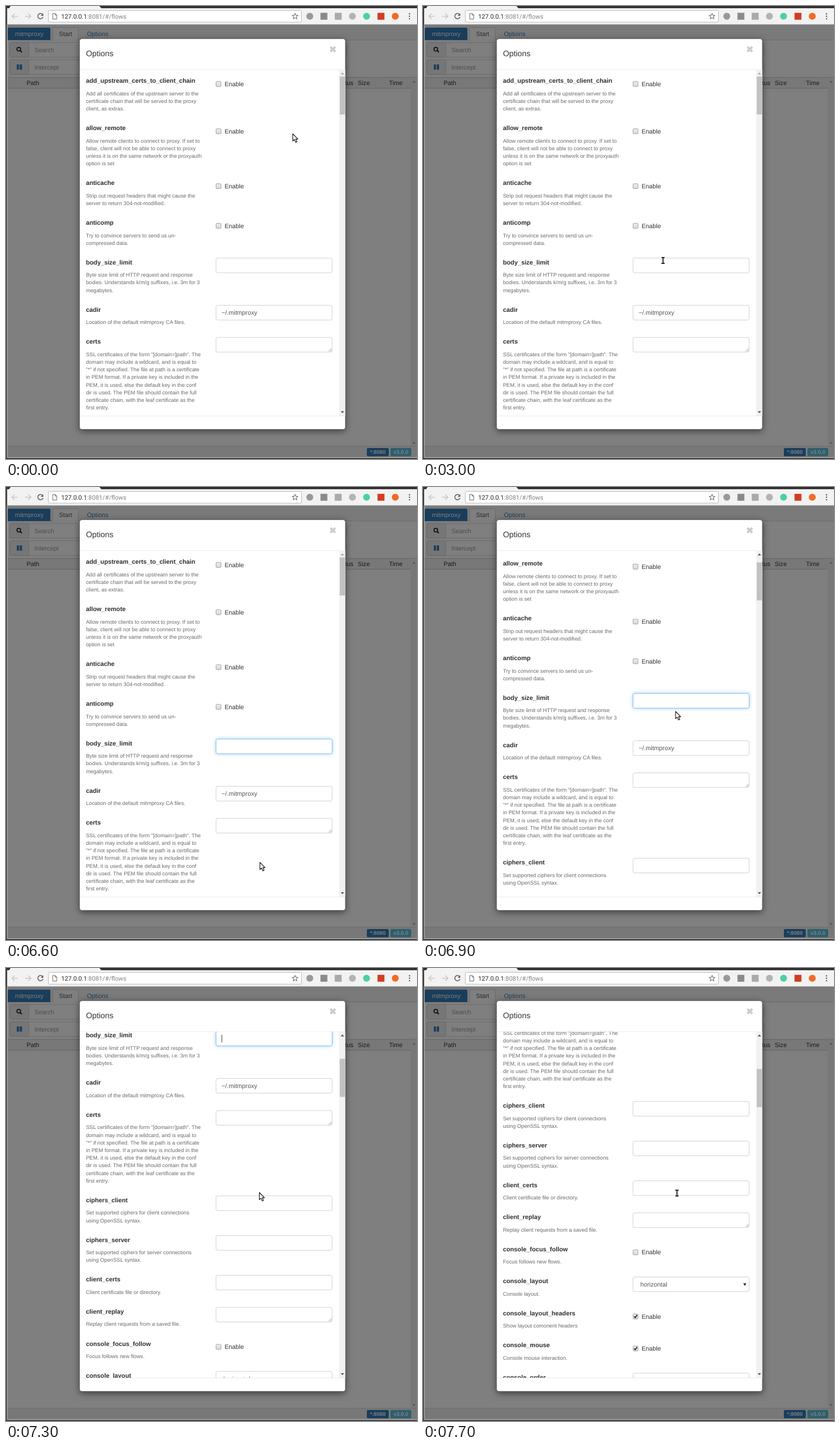
Recreate the animation shown at these times as an HTML page. Size 713 by 785 pixels, loop 8 s.

```html
<!DOCTYPE html>
<html lang="en">
<head>
<meta charset="utf-8">
<title>Proxy options</title>
<style>
  html, body { margin: 0; width: 100%; height: 100%; overflow: hidden; background: #808080; }
  svg { display: block; width: 713px; height: 785px; }
  text { font-family: "Liberation Sans", Arial, sans-serif; text-rendering: geometricPrecision; white-space: pre; }
  .url { font-family: Roboto, "Liberation Sans", sans-serif; }
  .modal { filter: drop-shadow(0 3.85px 5.8px rgba(0, 0, 0, .5)); }
</style>
</head>
<body>
<svg id="stage" viewBox="0 0 713 785" xmlns="http://www.w3.org/2000/svg">
  <defs>
    <clipPath id="bodyClip"><rect x="128" y="110.5" width="450" height="599.5"/></clipPath>
    <linearGradient id="boxFill" x2="0" y2="1"><stop stop-color="#eee"/><stop offset="1" stop-color="#d8d8d8"/></linearGradient>
  </defs>
  <g id="page"></g>
  <g id="chrome"></g>
  <g id="modal"></g>
  <g clip-path="url(#bodyClip)"><g id="options"></g></g>
  <g id="bars"></g>
  <g id="pointer"></g>
</svg>
<script>
const $ = id => document.getElementById(id);
const BODY = 10.78, SMALL = 9.24, HAIR = .77, LEFT = 138.7, FIELD = 363.9;

function add(parent, tag, attrs, content) {
  const el = document.createElementNS('http://www.w3.org/2000/svg', tag);
  for (const key in attrs) el.setAttribute(key, attrs[key]);
  if (content !== undefined) el.textContent = content;
  parent.append(el);
  return el;
}
const rect = (g, x, y, width, height, fill, more) => add(g, 'rect', { x, y, width, height, fill, ...more });
const path = (g, d, more) => add(g, 'path', { d, fill: 'none', ...more });
const text = (g, x, y, str, size, fill, more) => add(g, 'text', { x, y, 'font-size': size, fill, ...more }, str);
const bold = { 'font-weight': 700 };
const show = (el, on) => el.setAttribute('visibility', on ? 'inherit' : 'hidden');
const move = (el, x, y) => el.setAttribute('transform', `translate(${x} ${y})`);

// Rounded box whose hairline border lies inside its edges
const framed = (g, x, y, width, height, fill, stroke, rx) =>
  rect(g, x + HAIR / 2, y + HAIR / 2, width - HAIR, height - HAIR, fill, { rx, stroke, 'stroke-width': HAIR });

// Page behind the dialog, in full colour under a half-black veil
function badge(g, x, width, str, fill) {
  rect(g, x, 766, width, 14.3, fill, { rx: 2 });
  text(g, x + width / 2, 776, str, SMALL, '#fff', { ...bold, 'text-anchor': 'middle' });
}

function filterRow(g, y, label) {
  framed(g, 6.2, y, 585.4, 26.2, '#fff', '#ccc', 3);
  framed(g, 6.2, y, 34, 26.2, '#eee', '#ccc', 3);
  text(g, 49.5, y + 16.9, label, BODY, '#999');
}

function drawPage(g) {
  rect(g, 0, 0, 713, 785, '#fff');
  rect(g, 2, 32, 711, 27, '#f6f6f6');
  rect(g, 2, 58.6, 711, HAIR, '#ccc');
  path(g, 'M3 59V39.5Q3 37.5 5 37.5H75Q77 37.5 77 39.5V59Z', { fill: '#337ab7' });
  text(g, 15.5, 52, 'mitmproxy', BODY, '#fff');
  path(g, 'M81 59.5V39.5Q81 37.5 83 37.5H123Q125.3 37.5 125.3 39.5V59.5', { fill: '#fff', stroke: '#ccc', 'stroke-width': HAIR });
  text(g, 92, 52, 'Start', BODY, '#555');
  text(g, 140.5, 52, 'Options', BODY, '#337ab7');
  filterRow(g, 62.8, 'Search');
  filterRow(g, 92.8, 'Intercept');
  add(g, 'circle', { cx: 22.2, cy: 74.8, r: 3.2, fill: 'none', stroke: '#222', 'stroke-width': 1.7 });
  path(g, 'M24.6 77.2L27.5 80', { stroke: '#222', 'stroke-width': 2 });
  rect(g, 18.8, 101.3, 3.8, 9, '#337ab7');
  rect(g, 24, 101.3, 3.8, 9, '#337ab7');

  rect(g, 2, 123.8, 711, 18.6, '#f2f2f2');
  rect(g, 2, 123.5, 711, HAIR, '#bbb');
  rect(g, 2, 142, 700, HAIR, '#bbb');
  for (const [x, str] of [[35.7, 'Path'], [572, 'Status'], [610.3, 'Size'], [664.5, 'Time']])
    text(g, x, 136.8, str, BODY, '#333');
  rect(g, 702, 124.5, 11, 638, '#f1f1f1');
  path(g, 'M705 132.5L707.8 129.5L710.6 132.5Z', { fill: '#a3a3a3' });
  path(g, 'M705 756L707.8 759L710.6 756Z', { fill: '#a3a3a3' });

  rect(g, 2, 763, 711, 20, '#f2f2f2');
  rect(g, 2, 762.6, 711, HAIR, '#ccc');
  badge(g, 626, 38, '*:8080', '#337ab7');
  badge(g, 667, 36, 'v3.0.0', '#5bc0de');
  const flag = add(g, 'g', {});
  badge(flag, 10, 53, 'anticache', '#5cb85c');
  rect(g, 0, 32, 713, 753, '#000', { opacity: .5 });
  return flag;
}

function drawChrome(g) {
  rect(g, 0, 0, 713, 4.5, '#2f2e2d');
  path(g, 'M5 4.5L8 0H162L166 4.5Z', { fill: '#f2f2f2' });
  rect(g, 0, 3.8, 713, 28, '#f2f2f2');
  rect(g, 0, 31.6, 713, HAIR, '#a5a5a5');
  rect(g, 0, 0, 2, 785, '#3c3b39');
  rect(g, 0, 783, 713, 2, '#3c3b39');
  path(g, 'M2.2 32V782.6H713', { stroke: '#e4e4e4', 'stroke-width': HAIR });
  const line = { stroke: '#c9c9c9', 'stroke-width': 1.5 };
  path(g, 'M20.5 17.7H10.5M15 13L10.3 17.7L15 22.4', line);
  path(g, 'M33 17.7H43M38.5 13L43.2 17.7L38.5 22.4', line);
  path(g, 'M63.2 14.5A4.6 4.6 0 1 0 64.2 19', { stroke: '#5a5a5a', 'stroke-width': 1.5 });
  path(g, 'M64.6 12.6V17H60.2Z', { fill: '#5a5a5a' });
  rect(g, 73.5, 7.5, 439, 20.5, '#fff', { rx: 2, stroke: '#b5b5b5', 'stroke-width': .9 });
  path(g, 'M81 13H85.5L88 15.5V22.7H81ZM85.3 13V15.8H88', { stroke: '#666', 'stroke-width': 1 });
  const url = text(g, 95.7, 21.5, '', BODY, '#222', { class: 'url' });
  add(url, 'tspan', {}, '127.0.0.1');
  add(url, 'tspan', { fill: '#808080' }, ':8081/#/flows');
  let star = '';
  for (let i = 0; i < 10; i++) {
    const r = i % 2 ? 2.3 : 5.4, a = i * Math.PI / 5;
    star += `${i ? 'L' : 'M'}${501.5 + r * Math.sin(a)} ${18 - r * Math.cos(a)}`;
  }
  path(g, star + 'Z', { stroke: '#5a5a5a', 'stroke-width': 1 });

  const disc = (cx, fill) => add(g, 'circle', { cx, cy: 17.8, r: 6, fill });
  const tile = (cx, fill) => rect(g, cx - 6, 11.8, 12, 12, fill);
  disc(527, '#999'); tile(551.5, '#8a8a8a'); tile(576.3, '#aaa'); disc(601, '#b3b3b3');
  disc(625.5, '#4fcfa4'); tile(650.5, '#d13d23'); disc(675.3, '#f26a24');
  for (const cy of [13.5, 17.8, 22.1]) add(g, 'circle', { cx: 700, cy, r: 1.2, fill: '#5a5a5a' });
}

function drawModal(g) {
  framed(g, 127.2, 56.3, 462, 677.8, '#fff', '#505050', 4.3).setAttribute('class', 'modal');
  text(g, LEFT, 87.2, 'Options', 13.86, '#333');
  path(g, 'M562.8 70.8L571.2 79.2M571.2 70.8L562.8 79.2', { stroke: '#ccc', 'stroke-width': 3.8 });
  rect(g, 128, 109.8, 460.5, HAIR, '#e5e5e5');
  rect(g, 128, 710, 460.5, HAIR, '#e5e5e5');
}

// Form rows: name, control, description lines
const ROWS = [
  ['add_upstream_certs_to_client_chain', 'check', 'Add all certificates of the upstream server to the|certificate chain that will be served to the proxy|client, as extras.'],
  ['allow_remote', 'check', 'Allow remote clients to connect to proxy. If set to|false, client will not be able to connect to proxy|unless it is on the same network or the proxyauth|option is set'],
  ['anticache', 'check', 'Strip out request headers that might cause the|server to return 304-not-modified.'],
  ['anticomp', 'check', 'Try to convince servers to send us un-|compressed data.'],
  ['body_size_limit', 'input', 'Byte size limit of HTTP request and response|bodies. Understands k/m/g suffixes, i.e. 3m for 3|megabytes.'],
  ['cadir', 'input', 'Location of the default mitmproxy CA files.', '~/.mitmproxy'],
  ['certs', 'area', 'SSL certificates of the form "[domain=]path". The|domain may include a wildcard, and is equal to|"*" if not specified. The file at path is a certificate|in PEM format. If a private key is included in the|PEM, it is used, else the default key in the conf|dir is used. The PEM file should contain the full|certificate chain, with the leaf certificate as the|first entry.'],
  ['ciphers_client', 'input', 'Set supported ciphers for client connections|using OpenSSL syntax.'],
  ['ciphers_server', 'input', 'Set supported ciphers for server connections|using OpenSSL syntax.'],
  ['client_certs', 'input', 'Client certificate file or directory.'],
  ['client_replay', 'area', 'Replay client requests from a saved file.'],
  ['console_focus_follow', 'check', 'Focus follows new flows.'],
  ['console_layout', 'select', 'Console layout.', 'horizontal'],
  ['console_layout_headers', 'check', 'Show layout comonent headers', true],
  ['console_mouse', 'check', 'Console mouse interaction.', true],
  ['console_order', 'input', '']
];

function control(g, kind, value) {
  if (kind === 'check') {
    const box = rect(g, 364.4, 9, 8.6, 8.6, 'url(#boxFill)', { rx: 1.3, stroke: '#9a9a9a', 'stroke-width': .9 });
    const tick = path(g, 'M366.2 13.2L368.1 15.3L371.5 10.6', { stroke: '#222', 'stroke-width': 1.7 });
    show(tick, value);
    text(g, 379.2, 17, 'Enable', BODY, '#333');
    return { box, tick };
  }
  const box = framed(g, FIELD, 0, 202.3, 26.2, '#fff', '#c4c4c4', 2.8);
  const entry = text(g, kind === 'select' ? 377 : 374, 17.1, value || '', BODY, '#555');
  if (kind === 'area') path(g, 'M559.8 24.6L564.8 19.6M562.4 24.8L565 22.2', { stroke: '#888', 'stroke-width': .8 });
  if (kind === 'select') path(g, 'M555.6 11.2H561L558.3 16Z', { fill: '#333' });
  return { box, entry };
}

function defaultNote(g, y, value) {
  const note = text(g, FIELD, y, '', SMALL, '#222');
  add(note, 'tspan', {}, 'Default: ');
  add(note, 'tspan', bold, value);
  return note;
}

function drawOptions(root) {
  const rows = {};
  let top = 121.8;
  for (const [name, kind, help, value] of ROWS) {
    const g = add(root, 'g', {}), lines = help.split('|');
    move(g, 0, top);
    text(g, LEFT, 11.4, name, BODY, '#2e2e2e', bold);
    lines.forEach((str, i) => text(g, LEFT, 32.9 + 13.2 * i, str, SMALL, '#6a6a6a'));
    rows[name] = { g, ...control(g, kind, value) };
    top += 42.35 + 13.2 * lines.length;
  }
  return rows;
}

function drawBars(g) {
  rect(g, 578, 110.6, 10.5, 599.4, '#f1f1f1');
  const up = path(g, 'M580.6 118.6L583.6 115.2L586.6 118.6Z');
  path(g, 'M580.6 702.2L583.6 705.6L586.6 702.2Z', { fill: '#505050' });
  return { up, thumb: rect(g, 579, 122, 9, 66, '#c1c1c1') };
}

function drawPointers(g) {
  const ink = { fill: '#fff', stroke: '#111', 'stroke-width': 1.1, 'stroke-linejoin': 'round' };
  const arrow = path(g, 'M.5 .5V13L3.4 10.4L5.5 15.2L7.7 14.2L5.6 9.6H9.4Z', ink);
  const hand = path(g, 'M-1.2 8V1Q0 -.6 1.2 1V4.6Q2.4 3.8 3.2 5Q4.5 4.4 5.1 5.6Q6.6 5.2 6.8 7V9.5L5.6 12.3H-.6L-3.6 7.6Q-3.2 6 -1.2 8Z', ink);
  const beam = add(g, 'g', {});
  const shape = 'M-2.8 -5H2.8M0 -5V5M-2.8 5H2.8';
  path(beam, shape, { stroke: '#fff', 'stroke-width': 3.4, 'stroke-linecap': 'square' });
  path(beam, shape, { stroke: '#2a2a2a', 'stroke-width': 2 });
  return { arrow, hand, beam };
}

const flag = drawPage($('page'));
drawChrome($('chrome'));
drawModal($('modal'));
const rows = drawOptions($('options'));
const bars = drawBars($('bars'));
const pointers = drawPointers($('pointer'));
const cache = rows.anticache, limit = rows.body_size_limit;
const cacheNote = defaultNote(cache.g, 30.4, 'false');
const limitNote = defaultNote(limit.g, 35.8, 'null');
const caret = rect(limit.g, 374, 6.8, .9, 13, '#333');

// Motion: [time, value...]
const POINTER = [
  [100, 497, 221], [200, 491, 227], [300, 470, 246], [400, 440, 272], [500, 413, 296], [600, 399, 308], [700, 396.5, 310.5],
  [2500, 396.5, 310.5], [2600, 398, 322], [2700, 403, 355], [2800, 410, 400], [2900, 415, 432], [3000, 416.4, 441],
  [6100, 416.4, 441], [6200, 420, 520], [6300, 428, 640], [6400, 434, 735], [6500, 438, 748],
  [6600, 440, 650], [6700, 440, 490], [6800, 437.5, 388.5], [7100, 438, 388.5], [7300, 439, 388.5], [7700, 440.6, 390]
];
const SCROLL = [
  [6700, 0], [6800, 25], [6900, 79], [7000, 150], [7100, 212], [7200, 270],
  [7300, 327.3], [7400, 385], [7500, 440], [7600, 476], [7700, 491]
];

function track(keys, t) {
  const next = keys.findIndex(k => k[0] > t);
  if (next === 0) return keys[0].slice(1);
  if (next < 0) return keys[keys.length - 1].slice(1);
  const a = keys[next - 1], b = keys[next], p = (t - a[0]) / (b[0] - a[0]);
  return a.slice(1).map((v, i) => v + (b[i + 1] - v) * p);
}
const within = (t, from, to) => t >= from && t < to;

function pointerKind(t) {
  if (within(t, 600, 2700)) return 'hand';
  return within(t, 3000, 6200) || t >= 7700 ? 'beam' : 'arrow';
}

function render(time) {
  const t = Math.floor(time % 8000 / 100) * 100;

  const kind = pointerKind(t);
  for (const name in pointers) show(pointers[name], name === kind);
  move($('pointer'), ...track(POINTER, t));

  const [scroll] = track(SCROLL, t);
  move($('options'), 0, -scroll);
  bars.thumb.setAttribute('y', 122 + scroll * .108);
  bars.up.setAttribute('fill', scroll ? '#505050' : '#a3a3a3');

  show(cache.tick, within(t, 1500, 2500));
  show(cacheNote, within(t, 1600, 2600));
  show(flag, within(t, 1600, 2600));
  cache.box.setAttribute('stroke', within(t, 600, 2700) ? '#858585' : '#9a9a9a');

  const focus = Math.max(0, Math.min(1, (t - 3100) / 250));
  const mix = (from, to) => Math.round(from + (to - from) * focus);
  limit.box.setAttribute('stroke', `rgb(${mix(196, 102)},${mix(196, 175)},${mix(196, 233)})`);
  limit.box.style.filter = focus ? `drop-shadow(0 0 3px rgba(102,175,233,${.6 * focus}))` : 'none';

  const typed = within(t, 3800, 5700);
  limit.entry.textContent = typed ? '2' : '';
  show(limitNote, within(t, 3900, 5800));
  caret.setAttribute('x', typed ? 380.2 : 374);
  show(caret, t >= 3200 && !within(t, 4500, 5100) && !within(t, 6400, 7000) && t < 7600);
}

function tick(now) {
  render(now);
  requestAnimationFrame(tick);
}
render(0);
requestAnimationFrame(tick);
</script>
</body>
</html>
```
